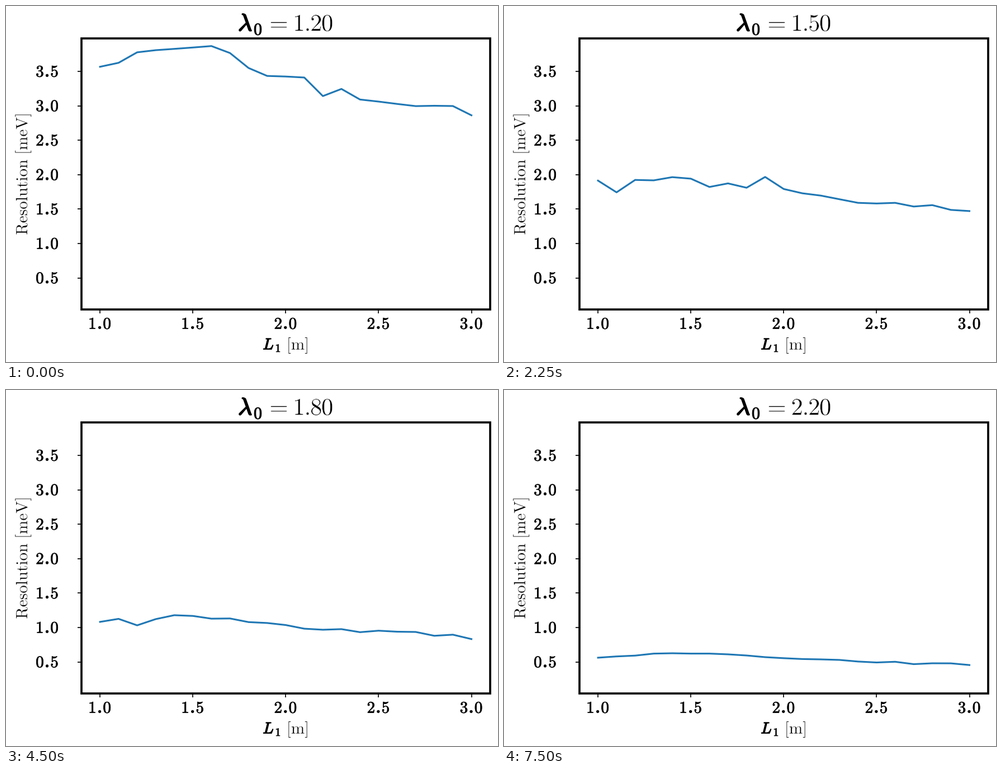
Recreate the animation shown at these times as a matplotlib script. Size 880x637 px, loop 8000 ms.

```python
import numpy as np
import matplotlib.pyplot as plt
from matplotlib.animation import FuncAnimation
from matplotlib.patches import PathPatch, Rectangle
from matplotlib.textpath import TextPath
from matplotlib.transforms import Affine2D

plt.rcParams["mathtext.fontset"] = "cm"

W, H, DPI = 880, 637, 64
PT = 72 / DPI                        # points per pixel
LEFT, RIGHT, TOP, BOTTOM = 135, 865.5, 57.5, 543
BODY, HEAD = 29.2, 43                # em sizes in pixels
LENGTHS = np.linspace(1, 3, 21)
PEAK = 3.985                         # top of the resolution axis


def wavelength(step):
    return 1.2 + 0.1 * step


def resolution(step):
    """Inverse cube of the wavelength, falling with length, with noise."""
    trend = np.interp(LENGTHS, [1, 1.4, 2, 2.5, 3],
                      [0.935, 1.02, 0.915, 0.82, 0.755])
    noise = np.random.default_rng(step).normal(1, 0.025, LENGTHS.size)
    return np.minimum(6.57 / wavelength(step) ** 3 * trend * noise, PEAK)


def col(v):
    return 168.1 + 332.2 * (v - 1)


def row(v):
    return 548.1 - 123.2 * v


def shape(tex, x, y, size, angle=0):
    """Outline with its ink centred on the point and its baseline through it."""
    path = TextPath((0, 0), f"${tex}$", size=size)
    box = path.get_extents()
    move = Affine2D().translate(-(box.x0 + box.x1) / 2, 0)
    move.rotate_deg(angle).scale(1, -1).translate(x, y)
    return move.transform_path(path)


def put(path, weight):
    """Fill an outline; positive weight thickens it, negative thins it."""
    edge = "black" if weight > 0 else "white"
    return ax.add_patch(PathPatch(path, fc="black", ec=edge,
                                  lw=abs(weight) * PT,
                                  joinstyle="round", zorder=4))


def number(text, x, y, size, digit, dot, font, dot_size=1):
    """Outlines of a number set from pen position x."""
    paths = []
    for ch in text:
        w = size * (dot if ch == "." else digit)
        em = size * dot_size if ch == "." else size
        paths.append(shape(rf"\{font}{{{ch}}}", x + w / 2, y, em))
        x += w
    return paths


def tick(v, xs, ys, x, y):
    ax.plot(xs, ys, color="black", lw=1.67 * PT, solid_capstyle="butt")
    left = x - BODY * 1.469 / 2
    for path in number(f"{v:.1f}", left, y, BODY, 0.575, 0.319, "mathbf", 1.4):
        put(path, 0.8)


def title_digits(step):
    return number(f"{wavelength(step):.2f}", 514.2, 44.6, HEAD,
                  0.462, 0.25, "mathrm")


fig = plt.figure(figsize=(W / DPI, H / DPI), dpi=DPI, facecolor="white")
ax = fig.add_axes([0, 0, 1, 1])
ax.set(xlim=(0, W), ylim=(H, 0))
ax.axis("off")
ax.add_patch(Rectangle((LEFT, TOP), RIGHT - LEFT, BOTTOM - TOP, fill=False,
                       ec="black", lw=3.7 * PT, joinstyle="miter", zorder=3))

for v in np.arange(1, 3.1, 0.5):
    tick(v, [col(v)] * 2, [BOTTOM, BOTTOM + 7.3], col(v) - 0.5, 577.6)
for v in np.arange(0.5, 3.6, 0.5):
    tick(v, [LEFT - 7.3, LEFT], [row(v)] * 2, 73.5, row(v) + 9.6)

put(shape(r"\mathrm{Resolution\ [meV]}", 38, 301.5, BODY, 90), -0.3)
put(shape("L", 469, 614.4, 28.2), 1.4)
put(shape(r"\mathbf{1}", 486.5, 619, 20.4), 0.7)
put(shape(r"\mathrm{[m]}", 522, 614.8, BODY), -0.3)

put(shape(r"\lambda", 428, 44.2, HEAD), 2.2)
put(shape(r"\mathbf{0}", 450.5, 51.5, 30), 1)
put(shape("=", 488, 44.6, HEAD), -0.5)
digits = [put(path, -0.5) for path in title_digits(0)]

line, = ax.plot(col(LENGTHS), row(resolution(0)), color="#1f77b4",
                lw=3.1 * PT, solid_capstyle="projecting",
                solid_joinstyle="round", zorder=2)


def draw(frame):
    step = min(frame // 3, 10)
    line.set_ydata(row(resolution(step)))
    for patch, path in zip(digits, title_digits(step)):
        patch.set_path(path)
    return [line, *digits]


anim = FuncAnimation(fig, draw, frames=32, interval=250, repeat=True,
                     repeat_delay=0, blit=False)
plt.show()
```
